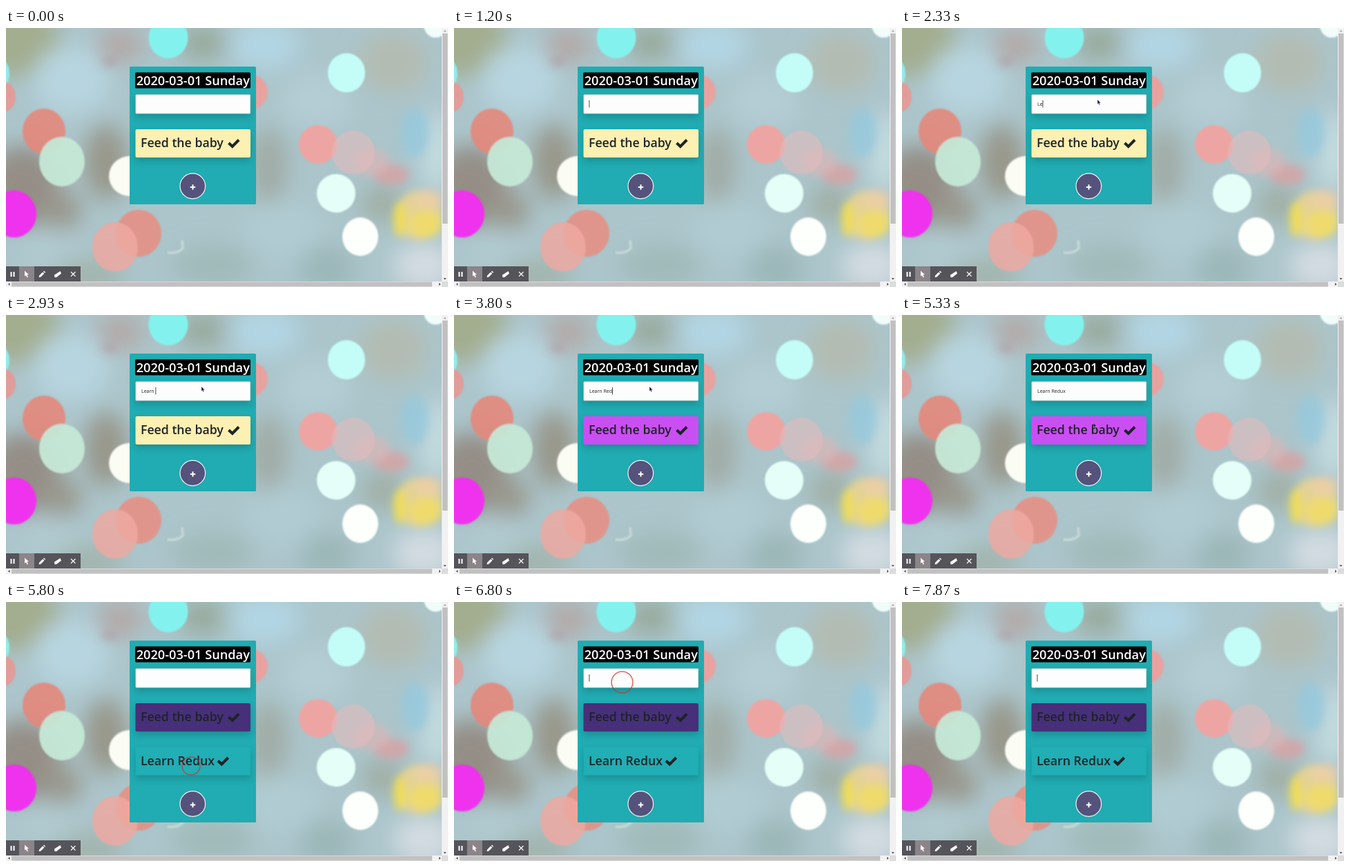
An HTML page for the animation above (8 s loop, 640x376 px).

```html
<!DOCTYPE html>
<html lang="en">
<head>
<meta charset="utf-8">
<title>Todo list</title>
<style>
  html, body { margin: 0; width: 100%; height: 100%; overflow: hidden; }
  svg { display: block; width: 100vw; height: 100vh; }
  text { font-family: "Open Sans", "Noto Sans", sans-serif; white-space: pre; }
  .title { font-size: 18.2px; font-weight: 600; fill: #fff; }
  .task text { font-size: 17.7px; font-weight: 600; fill: #1e2328; }
  .task path { fill: none; stroke: #1e2328; stroke-width: 4; }
  .lifted { filter: drop-shadow(0 5px 5px rgba(0, 0, 0, .17)); }
  #typed { font-size: 7px; fill: #222; }
</style>
</head>
<body>
<svg viewBox="0 0 640 376" preserveAspectRatio="none">
  <defs>
    <filter id="haze" x="-20%" y="-20%" width="140%" height="140%"><feGaussianBlur stdDeviation="16"/></filter>
    <filter id="soft" x="-20%" y="-20%" width="140%" height="140%"><feGaussianBlur stdDeviation="6"/></filter>
    <filter id="edge"><feGaussianBlur stdDeviation=".8"/></filter>
  </defs>

  <rect width="640" height="376" fill="#abc5cb"/>
  <g id="hazes" filter="url(#haze)"></g>
  <g id="softs" filter="url(#soft)"></g>
  <g id="lights" filter="url(#edge)"></g>
  <path d="M234 326q14 2 22-6l-1-12" fill="none" stroke="#dfeae6" stroke-width="4" opacity=".5" filter="url(#edge)"/>

  <!-- card -->
  <rect id="card" x="179" y="56" width="183" height="200" rx="1.5" fill="#20acb2"/>
  <rect x="187" y="64.5" width="167" height="23" rx="1.5"/>
  <text class="title" x="188.7" y="83">2020-03-01 Sunday</text>
  <rect class="lifted" x="187.8" y="96.8" width="166" height="27.4" rx="1" fill="#fdfdfd" stroke="#c4cccc" stroke-width=".6"/>
  <text id="typed" x="196" y="113"></text>
  <rect id="caret" y="105" width=".8" height="10.5" fill="#222"/>
  <g class="task">
    <rect id="first" class="lifted" x="187.5" y="147" width="166.5" height="41" rx="2"/>
    <text x="195" y="173">Feed the baby</text>
    <path d="M322.5 167l5.3 5l9.3-9.5"/>
  </g>
  <g id="second" class="task" transform="translate(0 63.5)">
    <rect class="lifted" x="187.5" y="147" width="166.5" height="41" rx="2" fill="#21aeb4"/>
    <text x="195" y="173">Learn Redux</text>
    <path d="M307 167l5.300 5l9.300-9.500"/>
  </g>
  <g id="add">
    <circle cx="270.3" cy="229.5" r="18.3" fill="#55527b" stroke="#f4f4f8" stroke-width="1.2"/>
    <path d="M266.800 231h7.400M270.500 227.300v7.400" stroke="#fff" stroke-width="2"/>
  </g>

  <!-- recorder toolbar -->
  <rect y="346" width="108" height="22" fill="#55545a"/>
  <rect x="19" y="346" width="22" height="22" fill="#8b8488"/>
  <g fill="#fff">
    <path d="M6.500 354h2v7h-2zM10.500 354h2v7h-2z"/>
    <path d="M27 352.500v8l2-1.600l1.600 3.300l1.400-.7l-1.600-3.200l2.600-.3z"/>
    <path d="M47.500 362l.7-2.800l5-5l2.200 2.200l-5 5zM54 353.500l1-1l2.200 2.200l-1 1z"/>
    <path d="M70 358.500l8.500-5.500l1.500 3.500l-7 5.500h-2.500z"/>
  </g>
  <path d="M94 354l6.500 6.500M100.500 354l-6.500 6.500" stroke="#fff" stroke-width="1.1"/>

  <!-- scrollbars -->
  <path d="M631 0h9v376H0v-8h631z" fill="#f1f1f1"/>
  <path d="M632 8h7.500v276h-7.500zM8 368.500h609v7H8z" fill="#c1c1c1"/>
  <rect x="631" y="368" width="9" height="8" fill="#dcdcdc"/>
  <path d="M633.500 5.500l2-2.500l2 2.500z" fill="#a3a3a3"/>
  <path d="M633.500 363l2 2.500l2-2.500zM627 370l2.500 2l-2.500 2zM5.500 370l-2.500 2l2.500 2z" fill="#505050"/>

  <path id="cursor" d="M0 0v6.500l1.500-1.300l1.200 2.600l1.100-.5l-1.100-2.500h2z" fill="#101c4c" stroke="#fff" stroke-width=".3"/>
  <circle id="ring" fill="none" stroke="#d0302e" stroke-width="1.5" opacity=".75"/>
</svg>
<script>
const $ = id => document.getElementById(id);
const set = (id, attrs) => { for (const k in attrs) $(id).setAttribute(k, attrs[k]); };
const show = (id, on) => $(id).style.display = on ? "" : "none";

// each entry: cx, cy, rx, ry, fill, opacity
function ellipses(id, list) {
  $(id).innerHTML = list.map(([x, y, rx, ry, fill, alpha = 1]) =>
    `<ellipse cx="${x}" cy="${y}" rx="${rx}" ry="${ry}" fill="${fill}" opacity="${alpha}"/>`).join("");
}

ellipses("hazes", [
  [15, 20, 65, 50, "#a3ad8f"],
  [95, 75, 55, 50, "#b7d5e0"],
  [165, 25, 35, 25, "#b3a8a6"],
  [285, 22, 35, 26, "#98aa9d"],
  [375, 25, 50, 35, "#b2d6e4"],
  [560, 50, 50, 45, "#b3bcb2"],
  [450, 105, 50, 40, "#b4cdd4"],
  [145, 195, 32, 55, "#98978a"],
  [25, 230, 55, 60, "#948e86"],
  [80, 265, 30, 30, "#99998e"],
  [60, 320, 45, 28, "#b0cad0"],
  [120, 360, 50, 25, "#a2b4ac"],
  [380, 200, 28, 55, "#a0aca6"],
  [400, 295, 55, 40, "#b0ccd3"],
  [300, 345, 60, 30, "#a0bab9"],
  [465, 350, 40, 35, "#9cb7b8"],
  [545, 255, 30, 28, "#a0afa5"],
  [605, 345, 45, 35, "#d3dce1"],
  [625, 180, 25, 60, "#c2dbdf"]
]);
ellipses("softs", [
  [592, 152, 20, 36, "#93c9de", .75],
  [558, 213, 26, 15, "#df9d9d", .7],
  [530, 195, 26, 20, "#dcb4b6", .65],
  [598, 272, 34, 36, "#eed58c", .85],
  [570, 278, 9, 26, "#f1de4e", .85],
  [608, 285, 24, 20, "#f2dc62", .8],
  [612, 248, 22, 14, "#edcda8", .7],
  [150, 48, 12, 8, "#b0959a", .5]
]);
ellipses("lights", [
  [235, 14, 28.5, 30, "#83f2ee"],
  [493, 65, 27, 28.5, "#c4fdf7"],
  [55, 150, 31, 33, "#e5887c", .9],
  [81, 194, 33, 36, "#c6e8d6", .95],
  [179, 215, 30, 29, "#fbfcf3"],
  [12, 270, 32, 34, "#ef30ee"],
  [192, 298, 33, 34, "#e68f82", .88],
  [158, 318, 33, 36, "#eea8a1", .85],
  [354, 93, 25, 25, "#ef9f9c", .9],
  [452, 169, 28, 28, "#f2a2a0", .92],
  [503, 181, 31, 32, "#e3bbbd", .6],
  [478, 240, 28, 28, "#e6fef8"],
  [513, 303, 26, 28, "#fcfffb"],
  [-8, 66, 13, 20, "#8defe9"],
  [-4, 100, 18, 22, "#ea9691", .85],
  [622, -4, 17, 18, "#f0fdfa"]
]);

const keys = [2070, 2330, 2430, 2530, 2670, 2930, 3400, 3600, 3800, 4000, 4270];
const phrase = "Learn Redux";
const added = 5730;

// pointer moves: start, end, from, to, hidden at
const moves = [
  [70, 400, [270, 230], [283, 104], 870],
  [1400, 1401, [283, 104], [283, 104], 4930],
  [5130, 5600, [283, 104], [268, 238], 5667],
  [6270, 6670, [268, 238], [244, 116], 6733]
];
// clicks: start, end, x, y
const clicks = [[870, 1200, 283, 105], [5667, 5930, 268, 238], [6733, 7000, 243.5, 116.5]];

function caretOn(t) {
  if (t < 1930) return t >= 870 && t < 1400;
  if (t < 4800) {
    const last = keys.filter(k => k <= t).pop() || 1930;
    return t - last < 530;
  }
  return t >= 6800 && (t < 7330 || t >= 7870);
}

function draw(t) {
  const done = t >= added;
  $("typed").textContent = done ? "" : phrase.slice(0, keys.filter(k => k <= t).length);
  show("caret", caretOn(t));
  const width = $("typed").textContent ? $("typed").getComputedTextLength() : -.5;
  set("caret", { x: 196 + width });

  set("card", { height: done ? 264 : 200 });
  set("first", { fill: done ? "#46307a" : t >= 3800 ? "#c94ff3" : "#fcf0b2" });
  show("second", done);
  set("add", { transform: `translate(0 ${done ? 63.5 : 0})` });

  const move = moves.find(m => t >= m[0] && t < m[4]);
  show("cursor", move);
  if (move) {
    const [start, end, from, to] = move;
    const p = Math.min(1, (t - start) / (end - start));
    const ease = p * p * (3 - 2 * p);
    const [x, y] = from.map((v, i) => v + (to[i] - v) * ease);
    set("cursor", { transform: `translate(${x} ${y})` });
  }

  const click = clicks.find(c => t >= c[0] && t < c[1]);
  show("ring", click);
  if (click) set("ring", { cx: click[2], cy: click[3], r: 8.4 + (click[1] - t) * .0355 });
}

const began = performance.now();
function tick() {
  draw((performance.now() - began) % 8000);
  requestAnimationFrame(tick);
}
tick();
</script>
</body>
</html>
```
